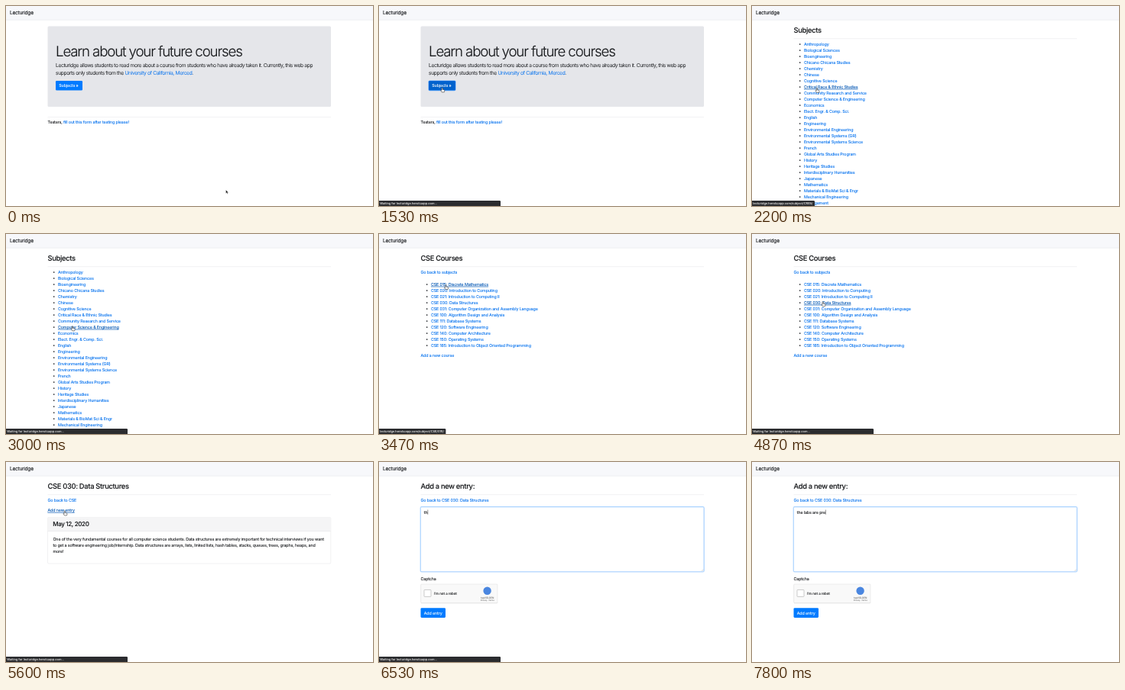
Animation of 480 by 262 pixels, one loop 8 s. Source, as an HTML page:

```html
<!DOCTYPE html>
<html lang="en">
<head>
<meta charset="utf-8">
<title>Course reviews</title>
<style>
  html, body { margin: 0; width: 100%; height: 100%; overflow: hidden; background: #fff; }
  svg { display: block; width: 100vw; height: 100vh; }
  /* The thin stroke stands for the heavier font smoothing of the desktop. */
  text, tspan { fill: currentColor; stroke: currentColor; stroke-width: .1px; }
  text {
    color: #16181b;
    font-family: Inter, Roboto, sans-serif;
    font-optical-sizing: none;
    text-rendering: geometricPrecision;
    white-space: pre;
  }
  .link { color: #0070ee; }
  .link.hover { color: #0056b3; text-decoration: underline; }
  .button rect { fill: #007bff; }
  .button text { color: #fff; }
  .button.hover rect { fill: #0069d9; }
  .button.active rect { fill: #0062cc; stroke: #007bff80; stroke-width: 1.1px; }
  .captcha { font-family: Roboto, sans-serif; }
  .captcha.small { color: #555; text-anchor: middle; stroke: none; }
  #statusText { color: #dcdcdc; }
  .page { visibility: hidden; }
  .page.shown { visibility: visible; }
</style>
</head>
<body>
<svg id="stage" viewBox="0 0 480 262" preserveAspectRatio="none"></svg>
<script>
const LOOP = 8000, FRAME = 1000 / 15;
const STATUS = 4, BODY = 16 / 3, LEAD = 20 / 3, CARD = 8, TITLE = 28 / 3, DISPLAY = 56 / 3;
const BRAND = 'Lecturidge', HOST = 'lecturidge.herokuapp.com';
const LEFT = 54.5, RIGHT = 425;

// Letter spacing in em, following the optical sizes of the system typeface.
const tracking = { [STATUS]: 0, [BODY]: -.022, [LEAD]: -.046, [CARD]: -.042, [TITLE]: -.034, [DISPLAY]: -.061 };

// Text is placed by its left edge and the vertical centre of its capitals.
const text = (x, middle, size, content, attrs = '') =>
  `<text x="${x}" y="${middle + size * .364}" font-size="${size}"
    style="letter-spacing:${tracking[size]}em" ${attrs}>${content}</text>`;
const link = (x, middle, content, path = '') =>
  text(x, middle, BODY, content, `class="link" data-x="${x}" data-y="${middle}" data-path="${path}"`);
const title = content => text(LEFT, 31.7, TITLE, content, 'font-weight="500"') + rule(42.7);
const rule = y => `<path d="M${LEFT} ${y}H${RIGHT}" stroke="#e4e5e7" stroke-width=".5"/>`;
const rect = (x, y, w, h, attrs) => `<rect x="${x}" y="${y}" width="${w}" height="${h}" ${attrs}/>`;
const button = (x, y, w, label, id) =>
  `<g class="button" id="${id}">${rect(x, y, w, 12.6, 'rx="1.3"')}${text(x + 4.3, y + 6.3, BODY, label)}</g>`;
const list = (top, items) => items.map(([label, path], i) =>
  `<circle cx="62.7" cy="${top + 8 * i + .3}" r=".85" fill="#212529"/>` + link(68, top + 8 * i, label, path)).join('');

const subjects = `Anthropology,Biological Sciences,Bioengineering,Chicano Chicana Studies,Chemistry,Chinese,
Cognitive Science,Critical Race &amp; Ethnic Studies:CRES,Community Research and Service:CRS,
Computer Science &amp; Engineering:CSE,Economics,Elect. Engr. &amp; Comp. Sci.,English,Engineering,
Environmental Engineering,Environmental Systems (GR),Environmental Systems Science,French,
Global Arts Studies Program,History,Heritage Studies,Interdisciplinary Humanities,Japanese,Mathematics,
Materials &amp; BioMat Sci &amp; Engr,Mechanical Engineering,Management`.split(/,\s*/).map(entry => {
  const [label, code = label.slice(0, 4).toUpperCase()] = entry.split(':');
  return [label, `/subject/${code}/`];
});

const courses = `015: Discrete Mathematics,020: Introduction to Computing,021: Introduction to Computing II,
030: Data Structures,031: Computer Organization and Assembly Language,100: Algorithm Design and Analysis,
111: Database Systems,120: Software Engineering,140: Computer Architecture,150: Operating Systems,
165: Introduction to Object Oriented Programming`.split(/,\s*/)
  .map(course => ['CSE ' + course, `/subject/CSE/${course.slice(0, 3)}/`]);

const home =
  rect(LEFT, 26.4, 370.5, 105.6, 'rx="1.6" fill="#e5e6ea"') +
  text(65, 59.4, DISPLAY, 'Learn about your future courses', 'font-weight="300"') +
  text(65, 77.7, LEAD, BRAND + ' allows students to read more about a course from students who have already taken it. Currently, this web app', 'font-weight="300"') +
  text(65, 87.7, LEAD, 'supports only students from the <tspan class="link">University of California, Merced</tspan>.', 'font-weight="300"') +
  button(65, 98, 35, 'Subjects »', 'subjects') +
  rule(145.6) +
  text(LEFT, 152.5, BODY, 'Testers, <tspan class="link">fill out this form after testing please!</tspan>');

const subjectPage = title('Subjects') + list(49.8, subjects);

const coursePage = title('CSE Courses') + link(LEFT, 49.8, 'Go back to subjects') +
  list(65.8, courses) + link(LEFT, 159, 'Add a new course');

const entryPage = title('CSE 030: Data Structures') + link(LEFT, 49.8, 'Go back to CSE') +
  link(LEFT, 63, 'Add new entry', '/subject/CSE/030/add/') +
  rect(LEFT, 72.5, 370.3, 60.5, 'rx="1.3" fill="#fff" stroke="#dcdcde" stroke-width=".4"') +
  rect(LEFT + .2, 72.7, 369.9, 18, 'rx="1.2" fill="#f5f5f6"') +
  `<path d="M${LEFT} 90.6H${RIGHT - .2}" stroke="#dcdcde" stroke-width=".4"/>` +
  text(61.2, 81.5, CARD, 'May 12, 2020', 'font-weight="500"') +
  ['One of the very fundamental courses for all computer science students. Data structures are extremely important for technical interviews if you want',
   'to get a software engineering job/internship. Data structures are arrays, lists, linked lists, hash tables, stacks, queues, trees, graphs, heaps, and',
   'more!'].map((line, i) => text(61.4, 101 + 8 * i, BODY, line)).join('');

const captcha = `<g id="captcha">` +
  rect(54.7, 160.4, 100.3, 25, 'rx="1" fill="#0001"') +
  rect(54.7, 160, 100.3, 24.6, 'rx="1" fill="#f9f9f9" stroke="#d3d3d3" stroke-width=".4"') +
  rect(59, 167.4, 9, 9, 'rx=".7" fill="#fff" stroke="#b5b5b5" stroke-width=".7"') +
  `<text class="captcha" x="72" y="173.7" font-size="4.67">I'm not a robot</text>
  <circle cx="141.6" cy="168.8" r="5.2" fill="#4a86e0"/>
  <text class="captcha small" x="141.8" y="178.5" font-size="3.33">tapVOLDEN</text>
  <text class="captcha small" x="141.8" y="182" font-size="2.67">Privacy - Terms</text></g>`;

const formPage = title('Add a new entry:') + link(LEFT, 49.8, 'Go back to CSE 030: Data Structures') +
  rect(LEFT - .4, 58.6, 371.2, 85.4, 'id="glow" rx="1.7" fill="none" stroke="#007bff40" stroke-width="1.1"') +
  rect(LEFT, 59, 370.3, 84.6, 'id="area" rx="1.3" fill="#fff" stroke-width=".5"') +
  '<path d="M421.8 142.8l2.2-2.2M423 142.8l1-1" stroke="#888" stroke-width=".3"/>' +
  text(58.8, 65.7, BODY, '', 'id="typed"') +
  '<path id="caret" d="M0 62.6V68.8" stroke="#111" stroke-width=".45"/>' +
  text(LEFT, 153, BODY, 'Captcha') + captcha + button(LEFT, 191.3, 32.5, 'Add entry', 'add');

const stage = document.getElementById('stage');
stage.innerHTML =
  rect(0, 0, 480, 18.3, 'fill="#f7f8fb"') +
  '<path d="M0 18.3H480" stroke="#dfe2e6" stroke-width=".5"/>' +
  text(5, 9, LEAD, BRAND) +
  [home, subjectPage, coursePage, entryPage, formPage].map(page => `<g class="page">${page}</g>`).join('') +
  `<g id="status">${rect(-2, 255, 10, 9, 'id="statusBox" rx="1.3" fill="#2b2c2f"')}
    ${text(1.2, 258.6, STATUS, '', 'id="statusText"')}</g>
  <path id="cursor" stroke-linejoin="round"/>`;

const $ = id => document.getElementById(id);
const pages = [...document.querySelectorAll('.page')];
const pageLinks = pages.map(page => [...page.querySelectorAll('[data-path]')]);
const pageStarts = [0, 1800, 3133, 5000, 5933];
const waits = [[1200, 1800], [2933, 3133], [4666, 5000], [5466, 7333]];

// time, x, y of the pointer's hot spot
const path = [
  [0, 287.6, 241], [200, 98.5, 110.8], [333, 98.5, 110.8], [1133, 82.6, 107.6], [1600, 82.6, 107.6],
  [2067, 84.6, 106.6], [2133, 84.6, 106.6], [2467, 87, 121.5], [3000, 87, 121.5], [3467, 87.4, 67.4],
  [3600, 87.4, 67.4], [3900, 92, 97], [4200, 93.5, 90.6], [4800, 93.5, 90.6], [5330, 76.8, 64.7],
  [5650, 76.8, 64.7], [6130, 136.5, 78], [LOOP, 136.5, 78]
];

const shapes = {
  arrow: ['M0 0V4.6L1.1 3.6 1.8 5.2 2.5 4.9 1.8 3.4H3.2Z', '#000', '#fff', .35],
  hand: ['M-.6-.4Q0-1.1 .6-.4V1.7L2.6 2.2Q3.4 2.5 3.2 3.5L2.7 5.3H-.4L-1.9 2.9Q-1.6 2.1-.6 2.8Z', '#fff', '#111', .5],
  beam: ['M-.9-3Q0-3 0-2.4V2.4Q0 3-.9 3M.9-3Q0-3 0-2.4M0 2.4Q0 3 .9 3', 'none', '#222', .5]
};

const clamp = (value, low, high) => Math.min(high, Math.max(low, value));
const show = (element, visible) => element.style.display = visible ? '' : 'none';

function pointerAt(t) {
  const next = Math.max(1, path.findIndex(key => key[0] > t));
  const [t0, x0, y0] = path[next - 1], [t1, x1, y1] = path[next];
  const k = (t - t0) / (t1 - t0), eased = k * k * (3 - 2 * k);
  return [x0 + (x1 - x0) * eased, y0 + (y1 - y0) * eased];
}

function drawStatus(t, url) {
  const wait = waits.find(([from, to]) => t >= from && t < to);
  show($('status'), wait || url);
  if (!wait && !url) return;
  const label = $('statusText');
  label.textContent = wait ? `Waiting for ${HOST}...` : HOST + url;
  const width = wait ? 159 * Math.min(1, .86 + (t - wait[0]) / 450) : label.getComputedTextLength() + 3.6;
  $('statusBox').setAttribute('width', width + 2);
  $('status').style.opacity = clamp((7333 - t) / 200, 0, 1);
}

function drawForm(t) {
  const focused = t >= 6266;
  const burst = (start, most) => clamp(Math.floor((t - start) / FRAME) + 1, 0, most);
  const count = burst(6466, 7) + burst(7066, 6) + burst(7733, 2) + (t >= 7733);
  $('typed').textContent = 'the labs are pre'.slice(0, count);
  const caretX = 59.1 + (count ? $('typed').getComputedTextLength() : 0);
  $('caret').setAttribute('transform', `translate(${caretX})`);
  show($('caret'), focused);
  show($('glow'), focused);
  $('glow').style.opacity = t < 6333 ? .5 : 1;
  $('area').setAttribute('stroke', focused ? '#80bdff' : '#ced4da');
  show($('captcha'), focused);
}

function draw(t) {
  const current = pageStarts.findLastIndex(start => t >= start);
  pages.forEach((page, i) => page.classList.toggle('shown', i === current));

  const [x, y] = pointerAt(t);
  let url = '';
  for (const item of pageLinks[current]) {
    const dx = x - item.dataset.x;
    const over = Math.abs(y - item.dataset.y) < 4 && dx >= 0 && dx <= item.getComputedTextLength();
    item.classList.toggle('hover', over);
    if (over) url = item.dataset.path;
  }
  const onButton = current === 0 && x > 65 && x < 100 && y > 98 && y < 110.6;
  if (onButton) url = '/subject';
  $('subjects').classList.toggle('hover', onButton);
  $('subjects').classList.toggle('active', onButton && t >= 1200);

  drawStatus(t, url);
  drawForm(t);

  const inArea = current === 4 && y > 59 && y < 143;
  const [d, fill, stroke, width] = shapes[url ? 'hand' : inArea ? 'beam' : 'arrow'];
  const attrs = { d, fill, stroke, 'stroke-width': width, transform: `translate(${x} ${y})` };
  for (const name in attrs) $('cursor').setAttribute(name, attrs[name]);
  show($('cursor'), t < 6466);
}

function tick() {
  const t = performance.now() % LOOP;
  draw(Math.min(LOOP - FRAME, Math.floor(t / FRAME + .06) * FRAME));
  requestAnimationFrame(tick);
}
tick();
</script>
</body>
</html>
```
